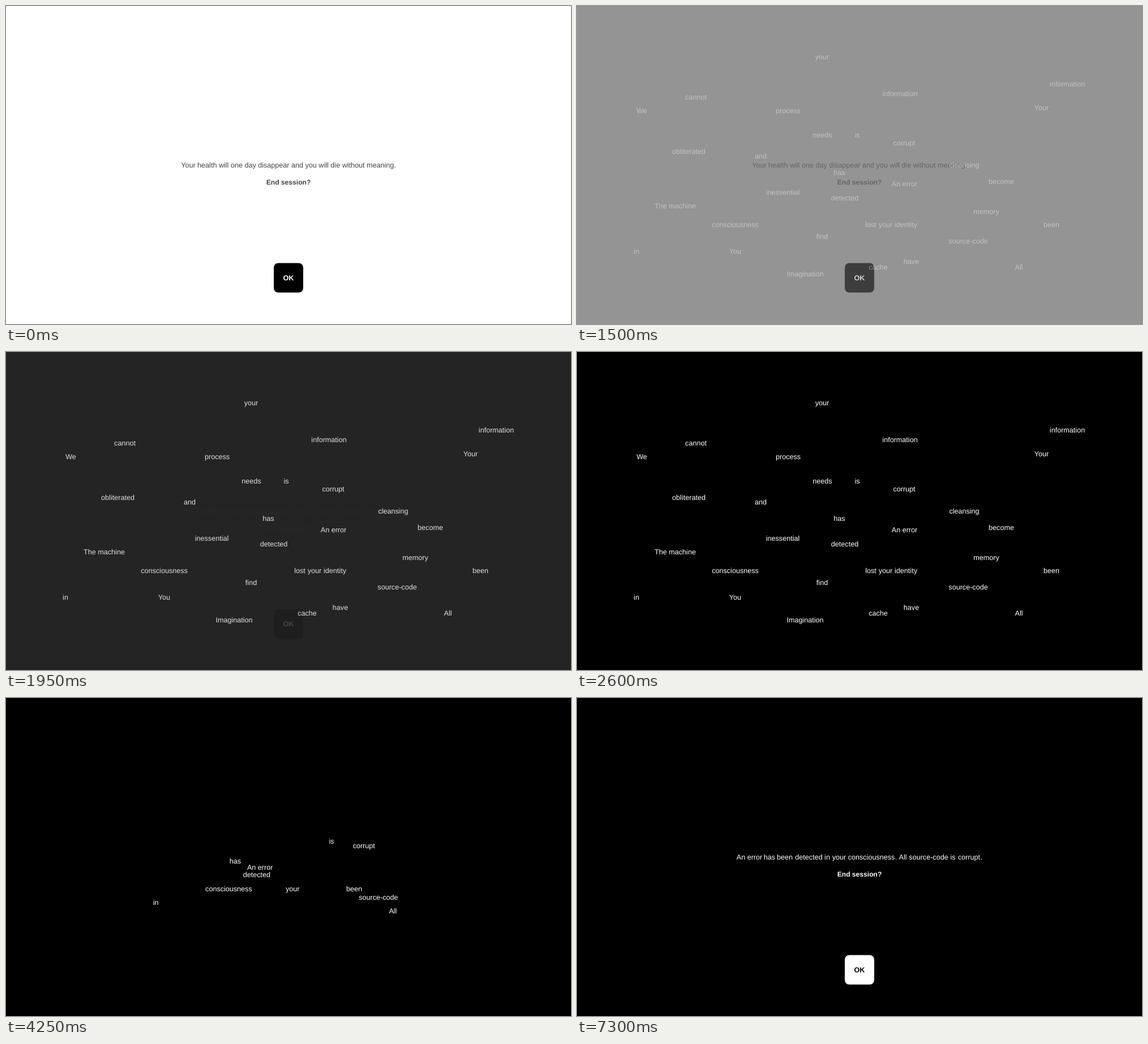
Recreate the animation shown at these times as an HTML page. Size 998x561 px, loop 8.05 s.

```html
<!DOCTYPE html>
<html lang="en">
<head>
<meta charset="utf-8">
<title>End session?</title>
<style>
  html, body { margin: 0; width: 100%; height: 100%; overflow: hidden; background: #fff; }
  svg { display: block; width: 998px; height: 561px; }
  text { font: 12.6px "Liberation Sans", Arial, sans-serif; text-anchor: middle; text-rendering: geometricPrecision; }
  .bold { font-size: 12.1px; font-weight: bold; }
  .ok { font-size: 12.6px; font-weight: bold; }
  #first { fill: #444; }
  #words, #last { fill: #fff; }
</style>
</head>
<body>
<svg id="stage" viewBox="0 0 998 561">
  <rect id="back" width="998" height="561"/>
  <g id="first">
    <text x="499" y="285.3">Your health will one day disappear and you will die without meaning.</text>
    <text class="bold" x="499" y="314.9">End session?</text>
    <rect x="473" y="453.5" width="52" height="52" rx="8" fill="#000"/>
    <text class="ok" x="499" y="484.2" fill="#fff">OK</text>
  </g>
  <g id="words"></g>
  <g id="last">
    <text class="bold" x="499" y="314.9">End session?</text>
    <rect x="473" y="453.5" width="52" height="52" rx="8"/>
    <text class="ok" x="499" y="484.2" fill="#000">OK</text>
  </g>
</svg>
<script>
const LOOP = 8050, STEP = 50, LINE = 281, BASELINE = 4.3;
const $ = id => document.getElementById(id);

// word, centre x, centre y, and for words of the closing sentence the final x
const WORDS = [
  ["your", 433, 90], ["information", 866, 137.5], ["cannot", 210, 160.5],
  ["information", 570.5, 155], ["We", 114.5, 184.5], ["process", 373, 184.5],
  ["Your", 820.5, 180], ["needs", 433.5, 228], ["is", 495, 228, 664],
  ["corrupt", 578, 242, 692.5], ["obliterated", 197.5, 257], ["and", 324.5, 265],
  ["cleansing", 684, 280.5], ["has", 463.5, 293.5, 340], ["become", 749.5, 309.5],
  ["An error", 578.5, 314, 304.5], ["inessential", 363.5, 329],
  ["detected", 473, 339, 409.5], ["The machine", 173.5, 352.5],
  ["memory", 723, 362.5], ["consciousness", 279.5, 386, 520],
  ["lost", 519, 386], ["your", 545, 386, 463], ["identity", 581, 386],
  ["been", 838, 386, 367], ["find", 433, 407], ["source-code", 691, 415, 621],
  ["in", 105, 433, 442], ["You", 279.5, 433], ["have", 590.5, 450.5],
  ["cache", 532, 461], ["All", 780.5, 461, 575.5], ["Imagination", 403, 473]
];

function addText(str, x, y) {
  const el = document.createElementNS("http://www.w3.org/2000/svg", "text");
  el.textContent = str;
  $("words").append(el);
  place(el, x, y);
  return el;
}

function place(el, x, y) {
  el.setAttribute("x", x);
  el.setAttribute("y", y + BASELINE);
}

const words = WORDS.map(([str, x, y, endX]) => ({ el: addText(str, x, y), x, y, endX }));
const stops = [563.5, 714.3].map(x => addText(".", x, LINE));

const mix = (a, b, k) => a + (b - a) * k;

// cubic ease-in-out between two times
function ease(t, start, end) {
  const u = Math.min(1, Math.max(0, (t - start) / (end - start)));
  return u < 0.5 ? 4 * u ** 3 : 1 - 4 * (1 - u) ** 3;
}

function draw(t) {
  const dark = ease(t, 440, 2690);
  const move = ease(t, 3700, 4820);
  const gone = ease(t, 3720, 4220);
  const grey = Math.round(255 * (1 - dark));

  $("back").setAttribute("fill", `rgb(${grey},${grey},${grey})`);
  $("first").setAttribute("opacity", 1 - dark);
  $("words").setAttribute("opacity", dark);
  $("last").setAttribute("opacity", ease(t, 6380, 7080));

  for (const w of words) {
    if (w.endX) place(w.el, mix(w.x, w.endX, move), mix(w.y, LINE, move));
    else w.el.setAttribute("opacity", 1 - gone);
  }
  for (const s of stops) s.setAttribute("opacity", ease(t, 4600, 4820));
}

const began = performance.now();
function tick() {
  const t = (performance.now() - began) % LOOP;
  draw(Math.floor(t / STEP) * STEP);
  requestAnimationFrame(tick);
}
tick();
</script>
</body>
</html>
```
